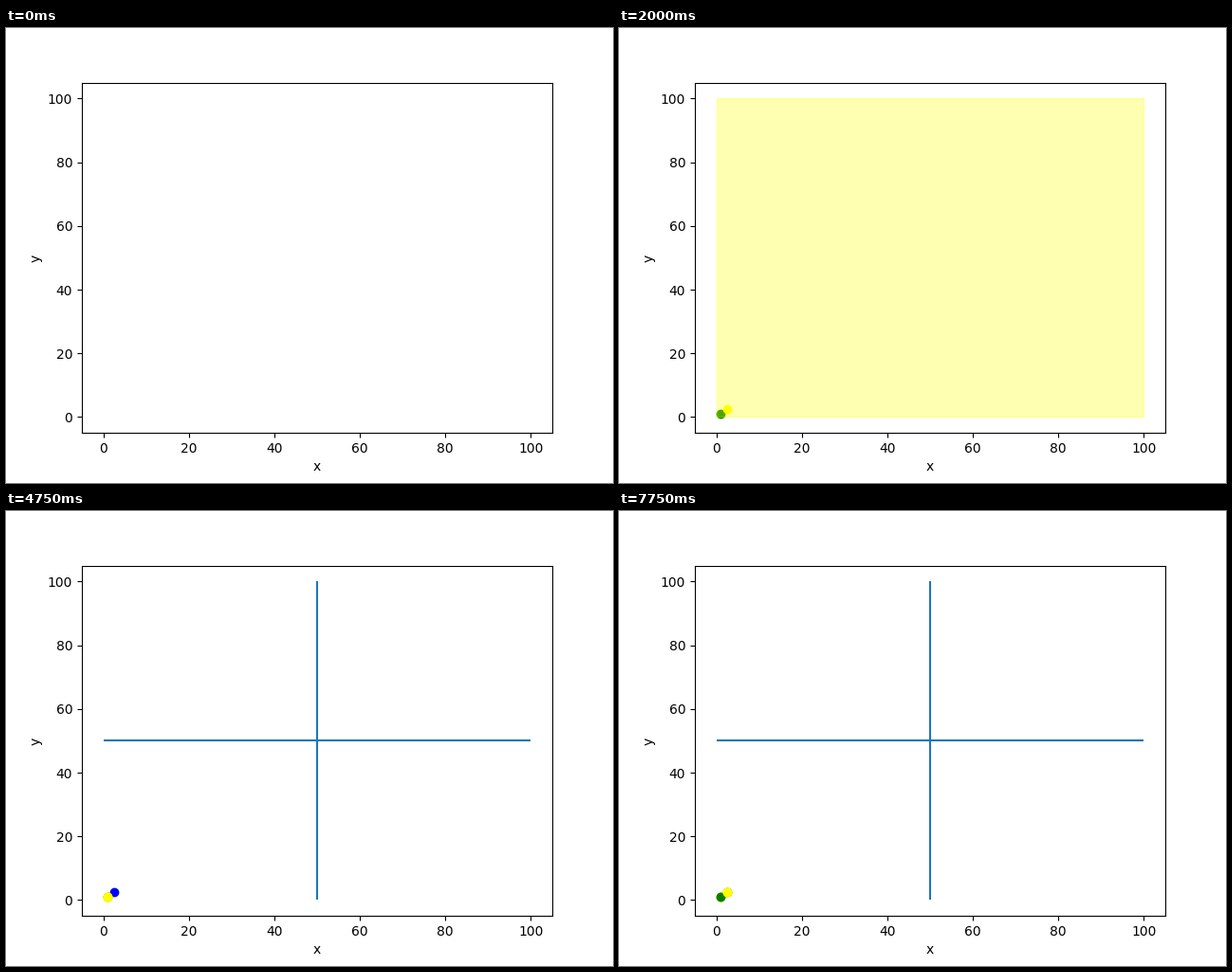
Write a matplotlib script that moves like this. It is 640 px wide and 480 px high and loops after 8 s.

```python
import matplotlib.pyplot as plt
from matplotlib.animation import FuncAnimation
from matplotlib.patches import Rectangle

FRAMES, INTERVAL = 32, 250
ROOT = (0, 0, 100)
QUADS = [(50, 50, 50), (50, 0, 50), (0, 0, 50)]  # NE, SE, SW
A, B = (1, 1), (2.5, 2.5)

fig, ax = plt.subplots(figsize=(6.4, 4.8), dpi=100)
ax.set(xlim=(-5, 105), ylim=(-5, 105), xlabel="x", ylabel="y")

timeline = []  # (artist, first step, end step)
step = 0


def show(artist, length=FRAMES):
    """Put an artist on the next step and keep it for some steps."""
    global step
    step += 1
    timeline.append((artist, step, step + length))


def dot(p, color):
    show(ax.scatter(*p, color=color))


def flash(box):
    """Highlight a cell for one step, then clear it on the following one."""
    global step
    x, y, size = box
    rect = Rectangle((x, y), size, size, color="yellow", alpha=0.3)
    show(ax.add_patch(rect), 1)
    step += 1


def visit(p, box):
    dot(p, "yellow")
    flash(box)


def split(box):
    x, y, size = box
    flash(box)
    show(ax.vlines(x + size / 2, y, y + size))
    show(ax.hlines(y + size / 2, x, x + size))


# First point fits into the root cell.
visit(A, ROOT)
dot(A, "green")

# Second point overflows it, so the cell is split.
visit(B, ROOT)
split(ROOT)
dot(B, "blue")

# Both points are handed down to the children.
for quad in QUADS:
    visit(A, quad)
dot(A, "green")
for quad in QUADS:
    visit(B, quad)

ax.set(xlim=(-5, 105), ylim=(-5, 105))


def update(i):
    for artist, first, end in timeline:
        artist.set_visible(first <= i < end)
    return [artist for artist, _, _ in timeline]


anim = FuncAnimation(fig, update, frames=FRAMES, interval=INTERVAL,
                     repeat=True, repeat_delay=0, blit=False)
plt.show()
```
